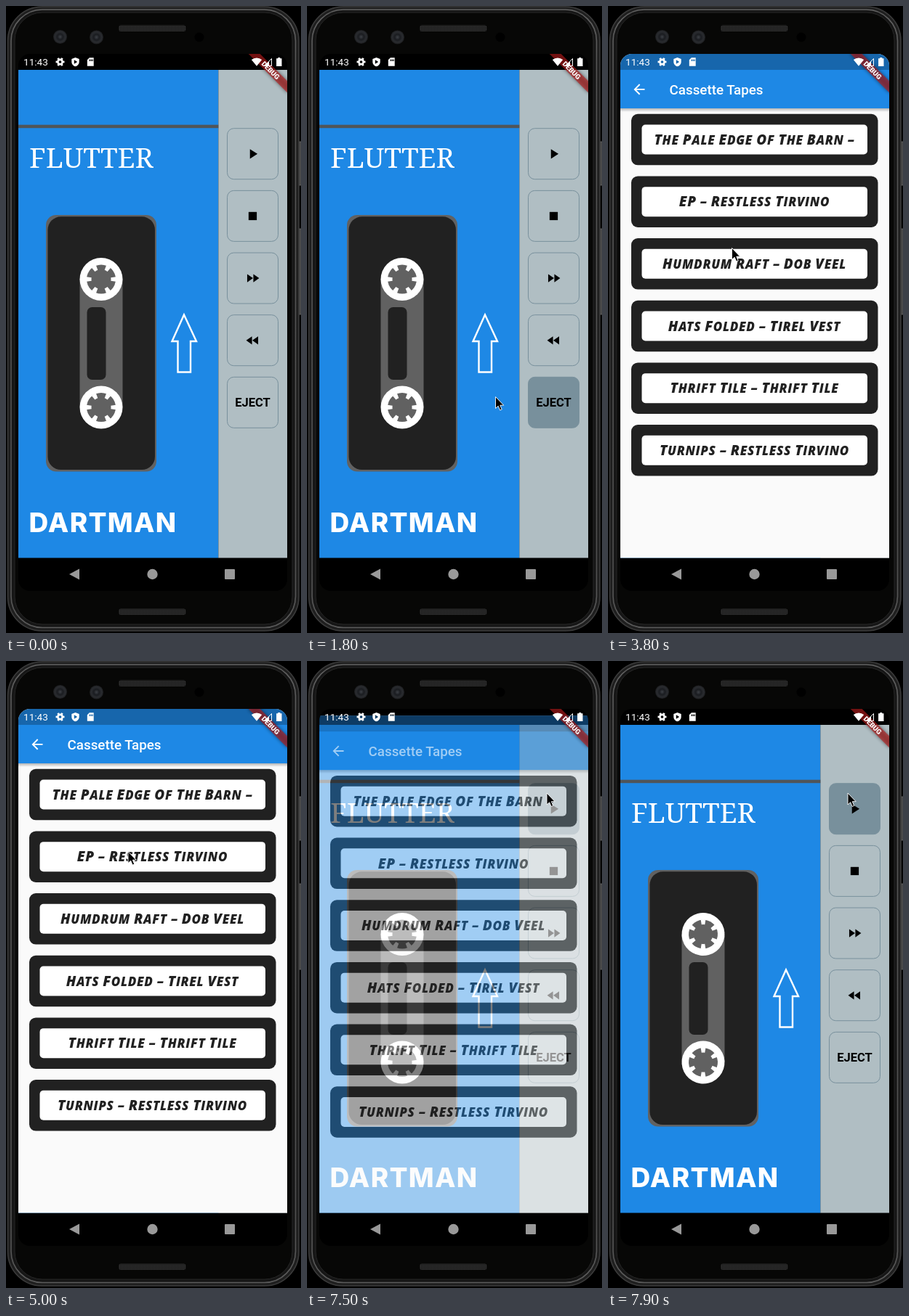
Write an HTML page that moves like this. It is 406x864 px and loops after 8 s.

```html
<!DOCTYPE html>
<html lang="en">
<head>
<meta charset="utf-8">
<title>Cassette player</title>
<style>
html, body { margin: 0; width: 100%; height: 100%; overflow: hidden; background: #000; }
svg { display: block; width: 100%; height: 100%; }
.ui { font-family: Roboto, sans-serif; }
.marker { font: italic 800 17px "Open Sans", sans-serif; letter-spacing: .7px; fill: #212121; text-anchor: middle; }
.marker .cap { font-size: 19px; }
</style>
</head>
<body>
<svg viewBox="0 0 406 864">
  <defs>
    <clipPath id="screen"><rect x="17" y="66" width="370" height="740" rx="16"/></clipPath>
    <clipPath id="app"><rect x="17" y="66" width="370" height="694.600"/></clipPath>
    <linearGradient id="edge" x2="0" y2="1">
      <stop offset="0" stop-color="#626262"/>
      <stop offset=".1" stop-color="#565656"/>
      <stop offset=".9" stop-color="#505050"/>
      <stop offset="1" stop-color="#5c5c5c"/>
    </linearGradient>
    <linearGradient id="shade" x2="0" y2="1">
      <stop offset="0" stop-opacity=".28"/>
      <stop offset="1" stop-opacity="0"/>
    </linearGradient>
    <radialGradient id="lens">
      <stop offset="0" stop-color="#3c3f45"/>
      <stop offset=".4" stop-color="#1a1c20"/>
      <stop offset=".75" stop-color="#2a2c30"/>
      <stop offset="1" stop-color="#1c1d1f"/>
    </radialGradient>
    <pattern id="mesh" width="2" height="2" patternUnits="userSpaceOnUse">
      <rect width="2" height="2" fill="#1c1c1c"/>
      <rect width="1" height="1" fill="#404040"/>
    </pattern>
    <filter id="soft" x="-30%" y="-100%" width="160%" height="300%"><feGaussianBlur stdDeviation="2.8"/></filter>
    <g id="reel">
      <circle r="29.500" fill="#fff"/>
      <circle r="20" fill="#616161"/>
      <circle r="17" fill="none" stroke="#fff" stroke-width="7" pathLength="60" stroke-dasharray="3.2 6.8" stroke-dashoffset="1.6"/>
    </g>
  </defs>

  <!-- phone -->
  <rect width="406" height="864"/>
  <g fill="#4a4a4a" stroke="#6a6a6a" stroke-width=".8">
    <rect x="403" y="187" width="5" height="60"/>
    <rect x="403" y="307" width="5" height="118"/>
  </g>
  <rect x="2.500" y="1" width="400.500" height="860" rx="47" fill="#1f1f1f" stroke="#3c3c3c" stroke-width="1.600"/>
  <rect x="7" y="5" width="391.500" height="851.500" rx="43" fill="#161616" stroke="url(#edge)" stroke-width="1.600"/>
  <rect x="12" y="9" width="382" height="843" rx="38" fill="#070706" stroke="#262626"/>
  <g fill="url(#mesh)">
    <rect x="155" y="26.500" width="92.500" height="8.500" rx="3"/>
    <rect x="155" y="830.500" width="92.500" height="8.500" rx="3"/>
  </g>
  <g fill="url(#lens)">
    <circle cx="74.500" cy="42.500" r="9.500"/>
    <circle cx="124.500" cy="43" r="9.500"/>
  </g>
  <circle cx="266" cy="43" r="6.500"/>

  <g clip-path="url(#screen)">
    <rect x="17" y="66" width="370" height="740"/>
    <g clip-path="url(#app)">
      <!-- player -->
      <rect x="17" y="88" width="275.300" height="673" fill="#1e88e5"/>
      <rect x="292.300" y="88" width="95" height="673" fill="#b0bec3"/>
      <rect x="17" y="163.700" width="275.300" height="4.500" fill="#505559"/>
      <text x="32" y="223" fill="#fff" font-family="Noto Serif, serif" font-weight="500" font-size="38.500">FLUTTER</text>
      <text x="31.500" y="725" fill="#fff" font-family="Inter, sans-serif" font-weight="800" font-size="37" letter-spacing="1.300">DARTMAN</text>
      <rect x="55" y="288" width="152" height="353.500" rx="14" fill="#616161"/>
      <rect x="57.500" y="290.300" width="147.500" height="348.800" rx="18" fill="#212121"/>
      <rect x="101.500" y="376" width="59" height="177" fill="#616161"/>
      <rect x="111.500" y="415" width="26" height="100" rx="7" fill="#212121"/>
      <g transform="translate(131 376.500)"><use class="spin" href="#reel"/></g>
      <g transform="translate(131 553)"><use class="spin" href="#reel"/></g>
      <path d="M245 425.500L262 462H254V504.500H236.500V462H228.500Z" fill="none" stroke="#fff" stroke-width="2.400"/>
      <g id="buttons"></g>

      <!-- tape list -->
      <g id="list">
        <rect x="17" y="66" width="370" height="695" fill="#fafafa"/>
        <rect x="17" y="141" width="370" height="5" fill="url(#shade)"/>
        <rect x="17" y="66" width="370" height="75" fill="#1e88e5"/>
        <rect x="17" y="66" width="370" height="22" opacity=".25"/>
        <path transform="translate(31.700 103.600) scale(.941)" d="M20 11H7.800l5.600-5.600L12 4l-8 8 8 8 1.400-1.400L7.800 13H20z" fill="#fff"/>
        <text class="ui" x="84.500" y="121.500" fill="#fff" font-size="18.800" font-weight="500">Cassette Tapes</text>
        <g id="cards"></g>
      </g>

      <!-- debug banner -->
      <g transform="translate(387 66) rotate(45)">
        <rect x="-37.600" y="26.400" width="75.200" height="11.300" opacity=".5" filter="url(#soft)"/>
        <rect x="-37.600" y="26.400" width="75.200" height="11.300" fill="#b71c1c" fill-opacity=".63"/>
        <text class="ui" y="35.500" fill="#fff" font-size="9.600" font-weight="900" text-anchor="middle">DEBUG</text>
      </g>
    </g>

    <!-- system bars -->
    <g fill="#fff">
      <text class="ui" x="24" y="82" font-size="13.600">11:43</text>
      <g fill="none" stroke="#fff">
        <circle cx="74.500" cy="77" r="3.200" stroke-width="2.700"/>
        <circle cx="74.500" cy="77" r="5" stroke-width="2" pathLength="48" stroke-dasharray="4 4" stroke-dashoffset="2"/>
        <path d="M365.500 72.500V82.500H356Z"/>
      </g>
      <path fill-rule="evenodd" d="M95.500 71l5.200 2v4c0 3-2.200 5.500-5.200 6.300c-3-.8-5.200-3.300-5.200-6.300v-4zM93.800 74.300v5.400l4.400-2.700z"/>
      <path fill-rule="evenodd" d="M114.800 71.300h5.900v11.400h-8.900v-8.400zM114.600 73.500v2.500h1.200v-2.500zM116.600 73.500v2.500h1.200v-2.500zM118.500 73.500v2.500h1.200v-2.500z"/>
      <path d="M345 82.800L337.800 74a11.500 11.500 0 0 1 14.400 0Z"/>
      <path d="M362 76L362 82.500H356Z"/>
      <path d="M374.300 71h3v1.300h2.200v10.700h-7.400v-10.700h2.200z"/>
    </g>
    <g fill="#999">
      <path d="M87 783L101 775.500V790.500Z"/>
      <circle cx="201.500" cy="783" r="7.200"/>
      <rect x="301" y="776" width="14" height="14" rx="1"/>
    </g>
  </g>
  <path id="cursor" d="M.5 .5V16.500L4.200 13.200 6.600 19 9.200 17.900 6.800 12.200H11.700Z" stroke="#fff" stroke-width=".9"/>
</svg>
<script>
const $ = id => document.getElementById(id);
const LOOP = 8000, STEP = 100, PITCH = 85.66;

const icons = [
  'M8 5v14l11-7z',
  'M6 6h12v12H6z',
  'M4 18l8.500-6L4 6zM13 6v12l8.500-6z',
  'M11 18V6l-8.500 6zM11.500 12l8.500 6V6z'
];
const tapes = [
  'The Pale Edge Of The Barn –',
  'EP – Restless Tirvino',
  'Humdrum Raft – Dob Veel',
  'Hats Folded – Tirel Vest',
  'Thrift Tile – Thrift Tile',
  'Turnips – Restless Tirvino'
];

$('buttons').innerHTML = [...icons, 'EJECT'].map((icon, i) => {
  const y = 168.7 + i * PITCH;
  const face = i < 4
    ? `<path transform="translate(328.2 ${y + 23.8}) scale(.941)" d="${icon}"/>`
    : `<text class="ui" x="339.5" y="${y + 41}" font-size="16.500" font-weight="700" text-anchor="middle">${icon}</text>`;
  return `<rect x="304.500" y="${y}" width="70" height="70" rx="9" fill="#78909c" fill-opacity="0" stroke="#78909c"/>${face}`;
}).join('');
const fills = $('buttons').querySelectorAll('rect');
const reels = document.querySelectorAll('.spin');

// Words already in capitals keep their full height.
const smallCaps = s => s.split(' ').map(w => {
  const tall = w === w.toUpperCase() ? w.length : 1;
  return `<tspan class="cap">${w.slice(0, tall)}</tspan>${w.slice(tall).toUpperCase()}`;
}).join(' ');

$('cards').innerHTML = tapes.map((name, i) => {
  const y = 148.8 + i * PITCH;
  return `<rect x="32" y="${y}" width="339.500" height="70.500" rx="9" fill="#212121"/>
    <rect x="46.500" y="${y + 14.7}" width="310.500" height="41" rx="5" fill="#fff"/>
    <text class="marker" x="201.500" y="${y + 42}">${smallCaps(name)}</text>`;
}).join('');

// time, x, y of the pointer tip
const path = [
  [500, 370, 620], [1000, 340, 554], [1500, 340, 554], [1800, 259, 538],
  [2100, 259, 538], [2500, 164.5, 418], [2700, 161, 360], [3000, 170, 307],
  [3300, 170, 307], [3800, 170, 333], [3900, 170, 333], [4400, 162, 425],
  [4800, 160, 358], [5000, 167.5, 262], [5600, 171.5, 184], [5700, 171.5, 184],
  [6100, 292, 180.5], [6300, 292, 180.5], [6600, 329.5, 181.5], [LOOP, 329.5, 181.5]
];

const clamp = v => Math.min(1, Math.max(0, v));
const ramp = (t, start, length) => clamp((t - start) / length);

function bezier(x1, y1, x2, y2) {
  const at = (a, b, s) => 3 * a * s * (1 - s) ** 2 + 3 * b * s * s * (1 - s) + s ** 3;
  return x => {
    let lo = 0, hi = 1;
    for (let i = 0; i < 24; i++) {
      const mid = (lo + hi) / 2;
      if (at(x1, x2, mid) < x) lo = mid; else hi = mid;
    }
    return at(y1, y2, hi);
  };
}
const easeIn = bezier(.42, 0, 1, 1);
const fastOutSlowIn = bezier(.4, 0, .2, 1);

function pointer(t) {
  const i = path.findIndex(p => p[0] > t);
  const [t0, x0, y0] = path[i - 1], [t1, x1, y1] = path[i];
  const k = (t - t0) / (t1 - t0);
  return [x0 + (x1 - x0) * k, y0 + (y1 - y0) * k];
}

function render(time) {
  const t = Math.floor((time % LOOP) / STEP + 1e-6) * STEP % LOOP;

  const shown = t >= path[0][0];
  $('cursor').style.display = shown ? '' : 'none';
  if (shown) $('cursor').setAttribute('transform', `translate(${pointer(t)})`);

  const page = t < 5000 ? ramp(t, 1800, 200) : 1 - ramp(t, 7416, 300);
  $('list').style.display = page > 0 ? '' : 'none';
  $('list').setAttribute('opacity', easeIn(page));
  $('list').setAttribute('transform', `translate(0 ${174 * (1 - fastOutSlowIn(page))})`);

  fills[4].setAttribute('fill-opacity', t < 5000 ? ramp(t, 1300, 300) : 0);
  fills[0].setAttribute('fill-opacity', t >= 7500 ? 1 : 0);

  const turn = 30 * ramp(t, 7500, 400);
  reels.forEach(r => r.setAttribute('transform', `rotate(${turn})`));
}

const start = performance.now();
function frame() {
  render(performance.now() - start);
  requestAnimationFrame(frame);
}
render(0);
requestAnimationFrame(frame);
</script>
</body>
</html>
```
